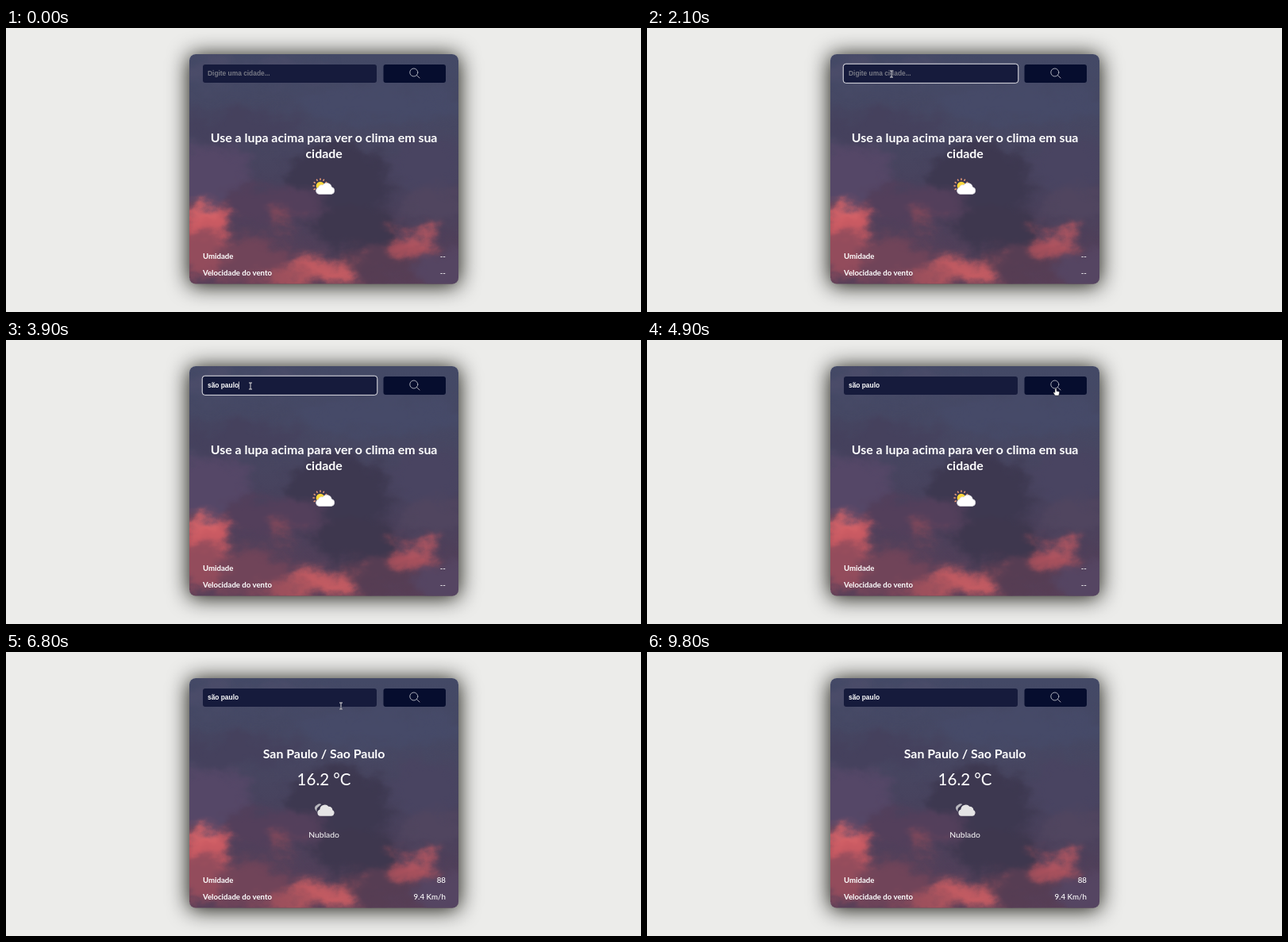
Recreate the animation shown at these times as an HTML page. Size 800 px wide and 358 px high, loop 9.9 s.

```html
<!DOCTYPE html>
<html lang="pt-BR">
<head>
<meta charset="utf-8">
<title>Clima</title>
<style>
  html, body { margin: 0; width: 100%; height: 100%; overflow: hidden; background: #ececea; }
  svg { position: absolute; left: 0; top: 0; }
  .shadow {
    position: absolute; left: 231px; top: 33px; width: 339px; height: 289px;
    border-radius: 8px; box-shadow: 0 2px 27px 1px rgba(8, 8, 0, .95);
  }
  #sky, #ui { will-change: transform; }
  text { font-family: Lato, sans-serif; fill: #fff; }
  .title { font-size: 15.9px; font-weight: 700; }
  .temperature { font-size: 20.5px; }
  .condition { font-size: 10.4px; }
  .label { font-size: 9.65px; font-weight: 700; }
  .value { font-size: 9.75px; font-weight: 500; }
  .middle { text-anchor: middle; }
  .end { text-anchor: end; }
  #field { font: bold 8.4px "Liberation Sans", Arial, sans-serif; }
</style>
</head>
<body>
<div class="shadow"></div>

<svg id="sky" width="800" height="358">
  <defs>
    <clipPath id="card"><rect x="231" y="33" width="339" height="289.5" rx="8"/></clipPath>
    <linearGradient id="dusk" x2="0" y2="1">
      <stop stop-color="#434966"/>
      <stop offset=".35" stop-color="#474762"/>
      <stop offset=".65" stop-color="#48405b"/>
      <stop offset="1" stop-color="#583f58"/>
    </linearGradient>
    <filter id="cloudy" filterUnits="userSpaceOnUse" x="190" y="0" width="420" height="358"
            color-interpolation-filters="sRGB">
      <feGaussianBlur stdDeviation="7" result="soft"/>
      <feTurbulence type="fractalNoise" baseFrequency=".025 .035" numOctaves="4" seed="8"/>
      <feDisplacementMap in="soft" scale="42" xChannelSelector="R" yChannelSelector="G"/>
    </filter>
    <filter id="haze" x="-20%" y="-20%" width="140%" height="140%"><feGaussianBlur stdDeviation=".6"/></filter>
  </defs>
  <g clip-path="url(#card)">
    <rect x="231" y="33" width="339" height="290" fill="url(#dusk)"/>
    <g id="clouds" filter="url(#cloudy)"></g>
  </g>
</svg>

<svg id="ui" width="800" height="358">
  <rect x="248" y="46" width="219" height="23" rx="3" fill="#161b3c"/>
  <rect id="focus" x="247.2" y="45.2" width="220.6" height="24.2" rx="3.5" fill="none" stroke="#dcdce2"/>
  <text id="field" x="254" y="60"></text>
  <path id="caret" stroke="#fff" stroke-width=".8" d="M0 52.5V62"/>
  <rect x="475.5" y="46" width="78.5" height="23" rx="3" fill="#060d2e"/>
  <g fill="none" stroke="#b9bbc6" stroke-width=".9" stroke-linecap="round">
    <circle cx="513.8" cy="56" r="5"/><path d="M517.4 59.6L521 63"/>
  </g>

  <g id="welcome">
    <text class="title middle" x="400.6" y="143.7">Use a lupa acima para ver o clima em sua</text>
    <text class="title middle" x="400.6" y="163.8">cidade</text>
    <g id="rays" stroke="#f2a07c" stroke-width="1.5" stroke-linecap="round"></g>
    <circle cx="396" cy="199" r="5.3" fill="#fbd83c"/>
    <path fill="#fff" stroke="#d9d9df" stroke-width=".7"
          d="M394.5 209.5a4.4 4.4 0 0 1-.8-8.6 4.5 4.5 0 0 1 5.4-2.9 6.2 6.2 0 0 1 11.2 2.5 4.6 4.6 0 0 1-.4 9z"/>
  </g>

  <g id="result">
    <text class="title middle" x="400.6" y="133.8">San Paulo / Sao Paulo</text>
    <text class="temperature middle" x="400.6" y="168">16.2 °C</text>
    <g filter="url(#haze)">
      <path fill="#b9b8bf" d="M394 202.5a5 5 0 0 1-4-3.2 4 4 0 0 1 1.5-6.3 5 5 0 0 1 6.5-.6l-2 6z"/>
      <path fill="#353149" d="M392 202a6 6 0 0 1 2.5-7.5 8 8 0 0 1 4-3l3 4z"/>
      <path fill="#e5e4e5"
            d="M396 206.8a4.3 4.3 0 0 1-.7-8.3 6.3 6.3 0 0 1 11.1-3.7 5 5 0 0 1 5 4.5 4 4 0 0 1-1.3 7.5z"/>
    </g>
    <text class="condition middle" x="400.6" y="234">Nublado</text>
  </g>

  <text class="label" x="248" y="291">Umidade</text>
  <text class="label" x="248" y="311.5">Velocidade do vento</text>
  <text class="value end" id="humidity" x="554" y="291"></text>
  <text class="value end" id="wind" x="554" y="311.5"></text>

  <g id="pointer" stroke-linejoin="round">
    <path id="arrow" fill="#fff" stroke="#222" stroke-width=".7" d="M0 0V9.5L2.2 7.5 3.7 11 5.2 10.3 3.7 7H6.8z"/>
    <g id="beam" fill="none">
      <path stroke="#20243c" stroke-width="2" d="M-2-4H2M0-4V4M-2 4H2"/>
      <path stroke="#e8e8ec" stroke-width=".9" d="M-2-4H2M0-4V4M-2 4H2"/>
    </g>
    <path id="hand" fill="#fff" stroke="#222" stroke-width=".5"
          d="M-1 .7Q0-.6 1 .7V3.4L3.9 4.1Q4.8 4.5 4.5 5.7L3.7 9H-.8L-3 5.8Q-3 4.4-1.8 4.8L-1 5.5z"/>
  </g>
</svg>

<script>
const $ = id => document.getElementById(id);
const LOOP = 9900, STEP = 100;
const FOCUS = 1500, TYPE = 2500, KEY_DELAY = 140, CLICK = 4900, RESULT = 5200;
const CITY = "são paulo";

// Cloud patches: centre x, centre y, radius x, radius y, colour.
const clouds = [
  [300, 55, 110, 16, "#4b4c69"],
  [470, 95, 110, 22, "#464a68"],
  [290, 125, 80, 22, "#45415d"],
  [255, 185, 48, 40, "#554767"],
  [420, 190, 66, 48, "#3d3850"],
  [530, 170, 45, 38, "#494461"],
  [335, 225, 70, 26, "#533f5b"],
  [440, 250, 55, 30, "#3e374e"],
  [545, 225, 42, 24, "#50455f"],
  [300, 292, 62, 32, "#704459"],
  [555, 305, 40, 28, "#554562"],
  [470, 295, 50, 24, "#563d53"],
  [243, 270, 32, 44, "#934c5c"],
  [256, 241, 28, 23, "#c95a62"],
  [350, 243, 17, 7, "#914b5a"],
  [405, 306, 42, 14, "#c65c62"],
  [360, 318, 38, 10, "#a9535d"],
  [508, 274, 28, 17, "#a54f5b"],
  [524, 262, 12, 9, "#b95862"],
  [246, 228, 16, 8, "#d96569"]
];
$("clouds").innerHTML = clouds.map(([x, y, rx, ry, color]) =>
  `<ellipse cx="${x}" cy="${y}" rx="${rx}" ry="${ry}" fill="${color}"/>`).join("");

$("rays").innerHTML = Array.from({ length: 7 }, (_, i) =>
  `<path d="M7.8 0H9" transform="translate(396 199) rotate(${150 + i * 30})"/>`).join("");

// Pointer stops: time, x, y.
const path = [
  [400, 372, 8], [1100, 308, 58], [4000, 308, 58], [4500, 600, 60],
  [4800, 515, 61], [5500, 515, 61], [6400, 422, 68], [7300, 422, 68]
];

function pointerAt(time) {
  const next = path.findIndex(stop => stop[0] > time);
  if (next < 1) return null;
  const [t0, x0, y0] = path[next - 1], [t1, x1, y1] = path[next];
  const u = (time - t0) / (t1 - t0), ease = u * u * (3 - 2 * u);
  return [x0 + (x1 - x0) * ease, y0 + (y1 - y0) * ease];
}

function show(id, visible) {
  $(id).style.display = visible ? "" : "none";
}

function drawPointer(time) {
  const position = pointerAt(time);
  show("pointer", position);
  if (!position) return;
  const [x, y] = position;
  const inRow = y >= 46 && y <= 69;
  const overField = inRow && x >= 248 && x <= 467;
  const overButton = inRow && x >= 475 && x <= 554;
  $("pointer").setAttribute("transform", `translate(${x} ${y})`);
  show("beam", overField);
  show("hand", overButton);
  show("arrow", !overField && !overButton);
}

function drawField(time) {
  const count = Math.max(0, Math.min(CITY.length, Math.floor((time - TYPE) / KEY_DELAY) + 1));
  const focused = time >= FOCUS && time < CLICK;
  const lastChange = count ? TYPE + (count - 1) * KEY_DELAY : FOCUS;
  const field = $("field");
  field.textContent = count ? CITY.slice(0, count) : "Digite uma cidade...";
  field.style.fill = count ? "#fff" : "#777985";
  show("focus", focused);
  show("caret", focused && (time - lastChange) % 1000 < 500);
  const width = count ? field.getComputedTextLength() : 0;
  $("caret").setAttribute("transform", `translate(${254.3 + width} 0)`);
}

function draw(now) {
  const time = Math.floor(now % LOOP / STEP) * STEP;
  const loaded = time >= RESULT;
  drawField(time);
  drawPointer(time);
  show("welcome", !loaded);
  show("result", loaded);
  $("humidity").textContent = loaded ? "88" : "--";
  $("wind").textContent = loaded ? "9.4 Km/h" : "--";
}

const start = performance.now();
function tick() {
  draw(performance.now() - start);
  requestAnimationFrame(tick);
}
tick();
</script>
</body>
</html>
```
